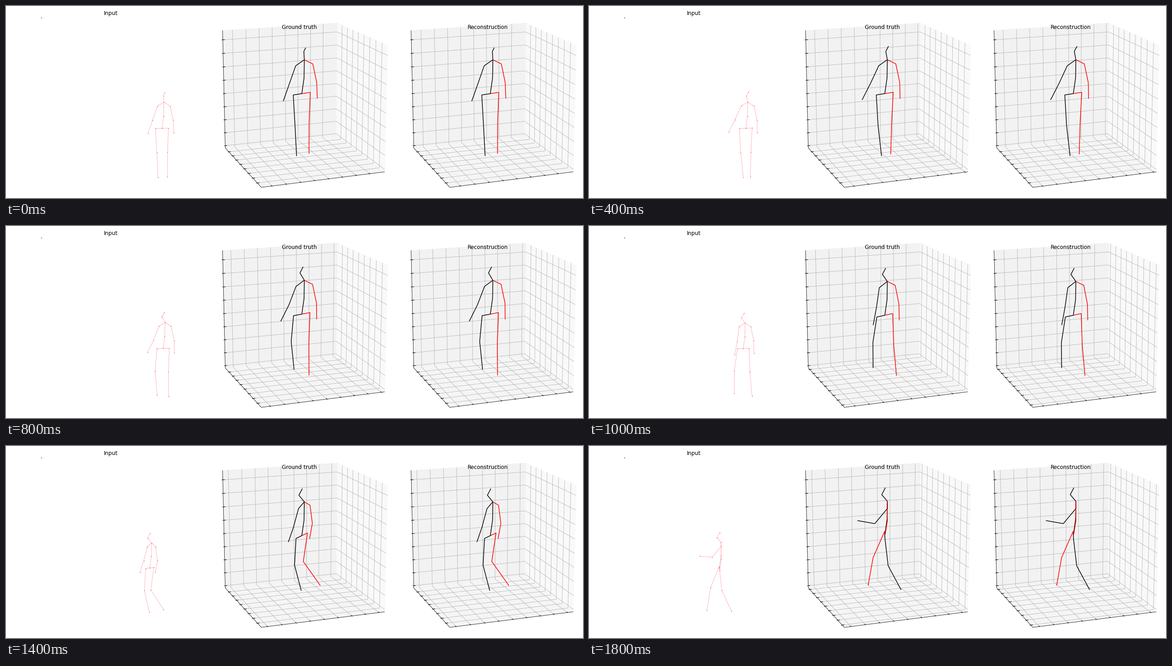
A matplotlib script for the animation above (2000 ms loop, 1280x427 px).

```python
import numpy as np
import matplotlib.pyplot as plt
from matplotlib.animation import FuncAnimation
from matplotlib.collections import LineCollection

W, H, DPI = 1280, 427, 64
FRAMES, INTERVAL = 10, 200
PX = 72 / DPI                      # points per pixel

plt.rcParams["font.family"] = "DejaVu Sans"
fig = plt.figure(figsize=(W / DPI, H / DPI), dpi=DPI, facecolor="white")
ax = fig.add_axes([0, 0, 1, 1])
ax.set_xlim(0, W)
ax.set_ylim(H, 0)
ax.axis("off")


def key(*points):
    """Smooth channel through (frame, value) keys, sampled once per frame."""
    k, v = np.array(points, float).T
    m = np.gradient(v, k)
    f = np.arange(FRAMES)
    i = np.clip(np.searchsorted(k, f, side="right") - 1, 0, len(k) - 2)
    h = k[i + 1] - k[i]
    t = (f - k[i]) / h
    return ((2 * t**3 - 3 * t**2 + 1) * v[i] + (3 * t**2 - 2 * t**3) * v[i + 1]
            + h * ((t**3 - 2 * t**2 + t) * m[i] + (t**3 - t**2) * m[i + 1]))


# --- view of the box ---
ELEV, AZIM, DIST, SCALE = np.radians(15), np.radians(70), 7.5, 2018
UNIT = SCALE / DIST                # pixels per box edge
CENTER = np.array([656.2, 208.2])
NORMAL = np.array([np.cos(AZIM) * np.cos(ELEV), np.sin(AZIM) * np.cos(ELEV), np.sin(ELEV)])
RIGHT = np.array([-np.sin(AZIM), np.cos(AZIM), 0])
NEAR = np.array([np.cos(AZIM), np.sin(AZIM), 0])
UP = np.cross(NORMAL, RIGHT)
BASIS = np.array([RIGHT, NEAR, [0, 0, 1]]) / UNIT


def project(points, dx=0):
    p = np.asarray(points, float)
    depth = DIST - p @ NORMAL
    xy = np.stack([p @ RIGHT, -(p @ UP)], axis=-1)
    return CENTER + [dx, 0] + SCALE * xy / depth[..., None]


# --- walker: joints as (right, near, up) in pixels, angles in degrees ---
def vec(right, near, up):
    return np.stack(np.broadcast_arrays(right, near, up, np.zeros(FRAMES))[:3], axis=-1)


def bone(length, lean, away=0):
    """Hanging bone leaning to the right and tipped away from the viewer."""
    b, d = np.radians(lean), np.radians(away)
    return length * vec(np.sin(b) * np.cos(d), -np.sin(d), -np.cos(b) * np.cos(d))


def chain(*parts):
    """Joints of a limb, each part being an offset from the joint before."""
    return np.cumsum(np.stack(parts, axis=1), axis=1)


turn = np.radians(key((0, 26), (4, 30), (6, 40), (8, 70), (9, 91)))
side = vec(np.cos(turn), -np.sin(turn), 0)
tilt = vec(0, 0, 3 * np.sin(turn) ** 2)
root = vec(0, 0, key((0, 13.7), (4, 12.6), (6, 8), (8, 10.6), (9, 10.6)))
nod = key((0, 3), (2, 10), (4, 30), (6, 37), (9, 40))
crown = key((0, 9), (2, 13), (9, 17.5))[:, None]

trunk = chain(root, vec(5, 0, 36), vec(0.5, 0, 41), bone(-19, nod), bone(-crown, -27))
chest = trunk[:, 2]
drop = vec(0, 0, -11.5)

lift_l = key((0, 2), (2, 2), (4, 20), (6, 18), (9, 16))
lift_r = key((0, 0), (6, 0), (8, 14), (9, 10))
reach_l = key((0, 0), (6, 0), (8, 32), (9, 20))
reach_r = key((0, 0), (6, 0), (9, 18))

leg_l = chain(
    root, -21 * side - tilt,
    bone(71, key((0, 3), (2, 3), (5, -8), (6, -8.5), (8, 3.5), (9, 6)), lift_l),
    bone(73, key((0, 2.7), (4, 5), (5, 0), (6, 6), (8, 19), (9, 25)),
         np.r_[lift_l[0], lift_l[:-1]]))
leg_r = chain(
    root, 21 * side + tilt,
    bone(71, key((0, -2), (4, -2), (6, 3), (8, -19), (9, -22)), lift_r),
    bone(73, key((0, 0), (4, 0.5), (5, 5), (6, 14), (8, 34), (9, -9.5)), lift_r))
arm_l = chain(
    chest, drop - 21 * side,
    bone(44, key((0, -19), (2, -24.5), (4, -20.5), (5, -8), (6, 0), (8, -34), (9, -39))),
    bone(41, key((0, -19), (2, -27), (4, -27), (5, -10.5), (6, 4), (8, -56), (9, -95)), reach_l))
arm_r = chain(
    chest, drop + 21 * side,
    bone(43, key((0, 11.5), (5, 11), (6, 9.5), (9, 1)), reach_r),
    bone(37, key((0, 2.5), (4, 1), (5, 1.5), (6, -6.5), (9, -8)), reach_r))

LIMBS = [(leg_r, "red"), (leg_l, "black"), (trunk, "black"), (arm_l, "black"), (arm_r, "red")]
COLORS = [c for _, c in LIMBS]

# --- grid slides as the box follows the walker ---
E = 0.5 * 25 / 24                  # half the box, with margin
STEP = 0.2 / 1.7
OUT, IN = E / 60, E / 30           # tick reach on either side of an edge

x_phase = key((0, .4345), (2, .442), (4, .449), (5, .4345), (6, .4015), (8, .295), (9, .232))
y_phase = key((0, .418), (2, .416), (4, .425), (5, .467), (6, .522), (8, .551), (9, .585))

walk = np.stack([x_phase[0] - x_phase, y_phase[0] - y_phase], axis=1)
across, depth = walk @ RIGHT[:2], walk @ NEAR[:2]


def ticks(phase):
    t = phase + STEP * np.arange(-10, 11)
    return t[np.abs(t) <= 0.5 + 1e-9]


def grid_lines(f):
    lines = [[(x, E, -E), (x, -E, -E), (x, -E, E)] for x in ticks(x_phase[f])]
    lines += [[(E, y, -E), (-E, y, -E), (-E, y, E)] for y in ticks(y_phase[f])]
    lines += [[(E, -E, z), (-E, -E, z), (-E, E, z)] for z in ticks(-0.5)]
    return lines


def tick_marks(f):
    lines = [[(x, E + OUT, -E), (x, E - IN, -E)] for x in ticks(x_phase[f])]
    lines += [[(E + OUT, y, -E), (E - IN, y, -E)] for y in ticks(y_phase[f])]
    lines += [[(E + OUT, -E, z), (E - IN, -E, z)] for z in ticks(-0.5)]
    return lines


def line_set(color, width, z):
    return ax.add_collection(LineCollection([], colors=color, linewidths=width * PX, zorder=z))


def label(x, y, text):
    ax.text(x, y, text, ha="center", va="baseline", fontsize=12 * PX, zorder=6)


class Panel:
    def __init__(self, dx, title):
        self.dx = dx
        panes = [("#f9f9f9", [(-E, -E, -E), (-E, E, -E), (-E, E, E), (-E, -E, E)]),
                 ("#f2f2f2", [(E, -E, -E), (-E, -E, -E), (-E, -E, E), (E, -E, E)]),
                 ("#f5f5f5", [(E, E, -E), (-E, E, -E), (-E, -E, -E), (E, -E, -E)])]
        for color, quad in panes:
            ax.add_patch(plt.Polygon(project(quad, dx), fc=color, ec=color, lw=PX, zorder=1))
        edge = project([(E, -E, E), (E, -E, -E), (E, E, -E), (-E, E, -E)], dx)
        ax.plot(*edge.T, color="black", lw=0.8 * PX, zorder=3)
        self.grid = line_set("#b0b0b0", 0.8, 2)
        self.marks = line_set("black", 1.1, 3)
        self.body = line_set(COLORS, 1.5, 4)
        label(651 + dx, 51, title)

    def update(self, f):
        self.grid.set_segments([project(s, self.dx) for s in grid_lines(f)])
        self.marks.set_segments([project(s, self.dx) for s in tick_marks(f)])
        self.body.set_segments([project(limb[f] @ BASIS, self.dx) for limb, _ in LIMBS])


def flat_view(points, f):
    """Level camera that stays put while the walker moves off."""
    size = 0.755 + 0.38 * depth[f]
    x = 346 + 230 * across[f]
    y = 272 + 50 * depth[f] + 0.755 * (root[0, 2] - root[f, 2])
    p = points - root[f]
    return np.stack([x + size * p[:, 0], y - size * p[:, 2]], axis=1)


label(232.5, 20, "Input")
ax.add_patch(plt.Rectangle((78.4, 26.2), 1.3, 1.3, fc="black", lw=0))
pink = line_set("pink", 1.25, 4)
dots = ax.scatter([], [], s=(1.7 * PX) ** 2, color="red", edgecolors="white",
                  linewidths=0.4 * PX, zorder=5)
panels = [Panel(0, "Ground truth"), Panel(418.2, "Reconstruction")]


def update(f):
    flat = [flat_view(limb[f], f) for limb, _ in LIMBS]
    pink.set_segments(flat)
    dots.set_offsets(np.vstack(flat))
    for p in panels:
        p.update(f)
    return []


anim = FuncAnimation(fig, update, frames=FRAMES, interval=INTERVAL,
                     init_func=lambda: update(0), repeat=True, repeat_delay=0)
plt.show()
```
